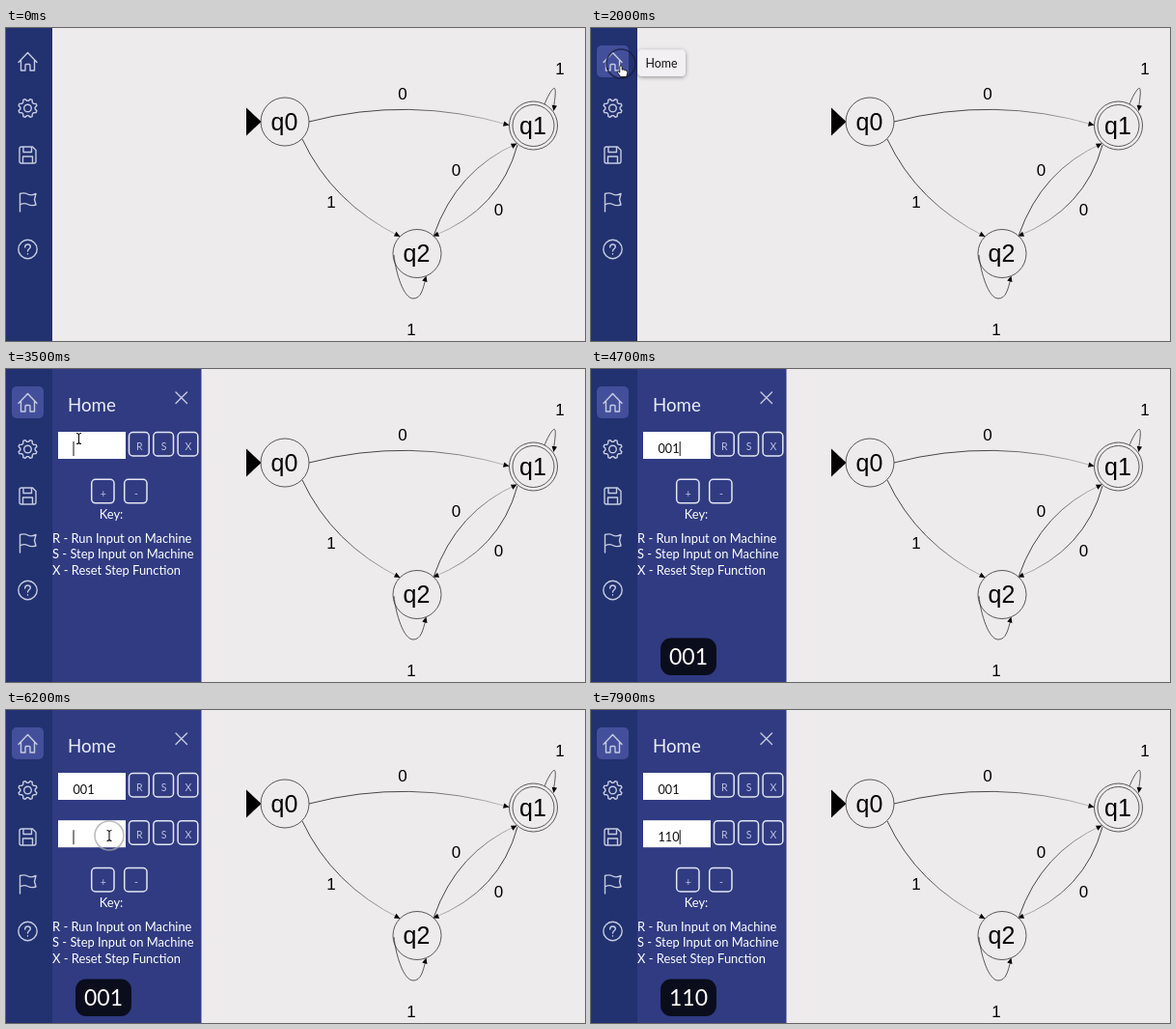
Write an HTML page that moves like this. It is 600 px wide and 324 px high and loops after 8 s.

```html
<!DOCTYPE html>
<html lang="en">
<head>
<meta charset="utf-8">
<title>State machine editor</title>
<style>
html, body { margin: 0; width: 100%; height: 100%; overflow: hidden; background: #eeebec; }
svg { display: block; width: 600px; height: 324px; }
text { font-family: Lato, "Open Sans", sans-serif; white-space: pre; }
.graph text { font-family: "Liberation Sans", Arial, sans-serif; text-anchor: middle; }
.state { font-size: 25px; }
.label { font-size: 17px; }
.ring { fill: none; stroke: #333; stroke-width: .8; }
.icon { fill: none; stroke: #c6cbdf; stroke-width: 1.4; stroke-linecap: round; stroke-linejoin: round; }
.key rect { fill: none; stroke: #e4e6f1; stroke-width: 1.5; }
.key text { font-size: 10.5px; fill: #bcc2dc; text-anchor: middle; }
.legend { font-size: 12.9px; fill: #fff; }
.typed { font-size: 12.7px; fill: #111; }
</style>
</head>
<body>
<svg viewBox="0 0 600 324">
  <defs>
    <filter id="soft" x="-30%" y="-40%" width="160%" height="190%">
      <feDropShadow dx="0" dy="1" stdDeviation="2.2" flood-color="#000" flood-opacity=".4"/>
    </filter>
  </defs>
  <rect width="600" height="324" fill="#eeebec"/>
  <g class="graph" id="graph"><path d="M249 82.5V111.500L264.500 97Z"/></g>

  <g id="panel">
    <rect x="48" width="154.500" height="324" fill="#303b82"/>
    <text x="64" y="44" font-size="18.7" fill="#eceef6">Home</text>
    <path class="icon" d="M176 24l11.500 11.500M187.500 24L176 35.500"/>
    <g id="rows"></g>
    <g id="lower">
      <text class="legend" x="109" y="155" text-anchor="middle">Key:</text>
      <text class="legend" x="48" y="179.500">R - Run Input on Machine</text>
      <text class="legend" x="48" y="196">S - Step Input on Machine</text>
      <text class="legend" x="48" y="212.500">X - Reset Step Function</text>
    </g>
  </g>

  <rect width="48" height="324" fill="#22316f"/>
  <rect id="hover" x="6" y="18" width="33" height="33" rx="5" fill="#444f9b"/>
  <g class="icon">
    <path d="M13 35.500L22.500 25.500L32 35.500M15.500 33.500V44H20V38.500Q20 37.500 21 37.500H24Q25 37.500 25 38.500V44H29.500V33.500"/>
    <path id="gear"/>
    <circle cx="22.500" cy="83" r="3.800"/>
    <path d="M14 125Q14 123 16 123H27.500L31 126.500V138Q31 140 29 140H16Q14 140 14 138ZM18 123V128.500H26.500V123M17.500 140V133H27.500V140"/>
    <path d="M14.500 190V171.500Q19 170 22.500 172T31 171.500L29.500 177.500L31 183Q26 184.500 22.500 182.500T14.500 183"/>
    <circle cx="22.500" cy="229" r="9.700"/>
    <path d="M19.700 227Q19.700 224 22.500 224T25.300 226.500C25.300 228.500 22.500 228.500 22.500 231M22.500 233.800V234"/>
  </g>

  <g id="tip">
    <rect x="48.500" y="22.500" width="49.500" height="27.500" rx="4.500" fill="#f2f0f2" filter="url(#soft)"/>
    <text x="56.500" y="40.500" font-size="12.400" fill="#111">Home</text>
  </g>
  <g id="cast">
    <rect id="castBox" y="278.500" height="38.500" rx="11" fill="#0a0d1b"/>
    <text id="castText" x="101" y="306" font-size="23" fill="#fff" text-anchor="middle"></text>
  </g>
  <circle id="click" r="15" fill="none" stroke-width="1.600"/>
  <g id="mouse">
    <path id="hand" fill="#fff" stroke="#111" stroke-width=".9" stroke-linejoin="round"
      d="M-1.200 .6Q0 -.8 1.200 .6V4.200Q2.400 3.400 3.300 4.600Q4.500 4 5.200 5.200Q6.800 5 6.800 6.600C6.800 9 6 9.500 5.600 11.600H-.6C-1 9.800 -3 8.500 -4 6.300Q-3.200 5 -1.200 7Z"/>
    <g id="beam" fill="none">
      <path d="M-2.500 -5.500Q0 -5.500 0 -3.500Q0 -5.500 2.500 -5.500M0 -4V4M-2.500 5.500Q0 5.500 0 3.500Q0 5.500 2.500 5.500" stroke="#fff" stroke-width="2.400"/>
      <path d="M-2.500 -5.500Q0 -5.500 0 -3.500Q0 -5.500 2.500 -5.500M0 -4V4M-2.500 5.500Q0 5.500 0 3.500Q0 5.500 2.500 5.500" stroke="#111" stroke-width="1.100"/>
    </g>
  </g>
</svg>
<script>
const LOOP = 8000, OPEN = 2050, ADD = 5750, ROW = 49.2;
const $ = id => document.getElementById(id);

function add(parent, tag, attrs, text) {
  const el = document.createElementNS("http://www.w3.org/2000/svg", tag);
  for (const k in attrs) el.setAttribute(k, attrs[k]);
  if (text) el.textContent = text;
  parent.append(el);
  return el;
}

// State diagram
const graph = $("graph");

function edge(id, [x1, y1], curve, [x2, y2], angle) {
  const g = add(graph, "linearGradient", { id, gradientUnits: "userSpaceOnUse", x1, y1, x2, y2 });
  add(g, "stop", { offset: .45, "stop-color": "#333" });
  add(g, "stop", { offset: 1, "stop-color": "#bbb" });
  add(graph, "path", { d: `M${x1} ${y1}${curve} ${x2} ${y2}`, fill: "none", stroke: `url(#${id})`, "stroke-width": .9 });
  add(graph, "path", { d: "M0 0L-6 -2.700V2.700Z", transform: `translate(${x2} ${y2}) rotate(${angle})` });
}
edge("e01", [314, 97], "Q418 70", [521.5, 100.5], 14);
edge("e02", [307, 115], "Q338 181", [408.5, 216], 28);
edge("e21", [443.5, 214], "Q467 147", [529.5, 119.5], -27);
edge("e12", [530, 121], "Q512 188", [442.5, 215.5], 158);

function loop(d, x, y, angle) {
  add(graph, "path", { d, class: "ring" });
  add(graph, "path", { d: "M0 0L-6 -2.700V2.700Z", transform: `translate(${x} ${y}) rotate(${angle})` });
}
loop("M558 79C562 69 568 59 569 63.500S568 77 567.500 84", 567.5, 86, 98);
loop("M402 235C404 254 412 280 422 280C430 280 432 271 435 259", 435.5, 256.5, -74);

for (const [name, x, y, radii] of [["q0", 289, 97, [25]], ["q1", 546.5, 101, [25, 21.5]], ["q2", 426, 233.5, [25]]]) {
  for (const r of radii) add(graph, "circle", { cx: x, cy: y, r, class: "ring" });
  add(graph, "text", { x: x - .5, y: y + 8.5, class: "state" }, name);
}
for (const [s, x, y] of [["0", 411, 74], ["1", 574, 48], ["0", 466.5, 153], ["0", 510.5, 194], ["1", 337, 186], ["1", 420, 318]])
  add(graph, "text", { x, y, class: "label" }, s);

// Sidebar gear
$("gear").setAttribute("d", "M" + Array.from({ length: 32 }, (_, i) => {
  const r = (i + 1) % 4 < 2 ? 7.6 : 9.8, a = (i + .5) * Math.PI / 16;
  return (22.5 + r * Math.cos(a)).toFixed(1) + " " + (83 + r * Math.sin(a)).toFixed(1);
}).join("L") + "Z");

// Panel rows and buttons
function key(parent, s, x, y, w) {
  const g = add(parent, "g", { class: "key" });
  add(g, "rect", { x, y, width: w, height: 24.5, rx: 4 });
  add(g, "text", { x: x + w / 2 + .5, y: y + 18.5 }, s);
}
function makeRow(y) {
  const g = add($("rows"), "g", { transform: `translate(0 ${y})` });
  add(g, "rect", { x: 54, y: 65, width: 70, height: 28, fill: "#fff" });
  ["R", "S", "X"].forEach((s, i) => key(g, s, 127.5 + 25.3 * i, 65.5, 20.7));
  const text = add(g, "text", { x: 69.5, y: 87, class: "typed" });
  const caret = add(g, "rect", { y: 75, width: 1, height: 15, fill: "#111" });
  return { g, text, caret };
}
const rows = [makeRow(0), makeRow(ROW)];
key($("lower"), "+", 88.7, 114.3, 23.3);
key($("lower"), "-", 122.7, 114.3, 23.3);

// Timeline: [time, x, y] for the pointer, [time, text] for typing
const path = [[900, 84, 96], [1300, 31, 39], [2700, 31, 39], [3200, 75.5, 72], [5400, 75.5, 72],
              [5650, 101, 126], [5850, 101, 126], [6050, 107, 130], [8000, 107, 130]];
const clicks = [[1880, 31, 37, "#171d45"], [3250, 75.5, 72, "#aaa"], [5700, 101, 126, "#171d45"], [6050, 107, 130, "#aaa"]];
const typing = [
  { focus: 3300, blur: 5700, keys: [[4000, "0"], [4250, "00"], [4550, "001"]] },
  { focus: 6150, blur: 8000, keys: [[6850, "1"], [7150, "11"], [7500, "110"]] }
];

const show = (el, on) => el.style.opacity = +on;
const ramp = (t, a, b) => Math.min(1, Math.max(0, (t - a) / (b - a)));
const during = (t, a, b) => t >= a && t < b;
const textAt = (keys, t) => keys.reduce((s, k) => t >= k[0] ? k[1] : s, "");

function pointer(t) {
  let i = 0;
  while (i < path.length - 2 && t >= path[i + 1][0]) i++;
  const [a, b] = [path[i], path[i + 1]], p = ramp(t, a[0], b[0]), e = p * p * (3 - 2 * p);
  return [a[1] + (b[1] - a[1]) * e, a[2] + (b[2] - a[2]) * e];
}

function draw(t) {
  const added = t >= ADD;
  show($("panel"), t >= OPEN);
  show($("hover"), ramp(t, 1150, 1300));
  show($("tip"), ramp(t, 1300, 1500) - ramp(t, 2800, 2950));
  show(rows[1].g, added);
  $("lower").setAttribute("transform", `translate(0 ${added ? ROW : 0})`);

  rows.forEach(({ text, caret }, i) => {
    const { focus, blur, keys } = typing[i], s = textAt(keys, t);
    const last = keys.reduce((v, k) => t >= k[0] ? k[0] : v, focus);
    text.textContent = s;
    caret.setAttribute("x", 69.5 + s.length * 7.4);
    show(caret, during(t, focus, blur) && (t - last) % 1000 < 550);
  });

  const cast = textAt(typing[t < 6600 ? 0 : 1].keys, t), w = 18 + 13.3 * cast.length;
  $("castText").textContent = cast;
  $("castBox").setAttribute("x", 101 - w / 2);
  $("castBox").setAttribute("width", w);
  show($("cast"), cast ? 1 - (t < 6600 ? ramp(t, 6350, 6550) : 0) : 0);

  const [x, y] = pointer(t);
  const beam = during(t, 3100, 5500) || t >= ADD;
  $("mouse").setAttribute("transform", `translate(${x} ${y})`);
  show($("mouse"), during(t, 900, 4000) || during(t, 5400, 6850));
  show($("beam"), beam);
  show($("hand"), !beam);

  const c = clicks.find(c => during(t, c[0], c[0] + 200));
  show($("click"), c ? 1 - .3 * ramp(t, c[0], c[0] + 200) : 0);
  if (c) {
    $("click").setAttribute("cx", c[1]);
    $("click").setAttribute("cy", c[2]);
    $("click").setAttribute("stroke", c[3]);
  }
}

const start = performance.now();
function tick() {
  draw((performance.now() - start) % LOOP);
  requestAnimationFrame(tick);
}
tick();
</script>
</body>
</html>
```
